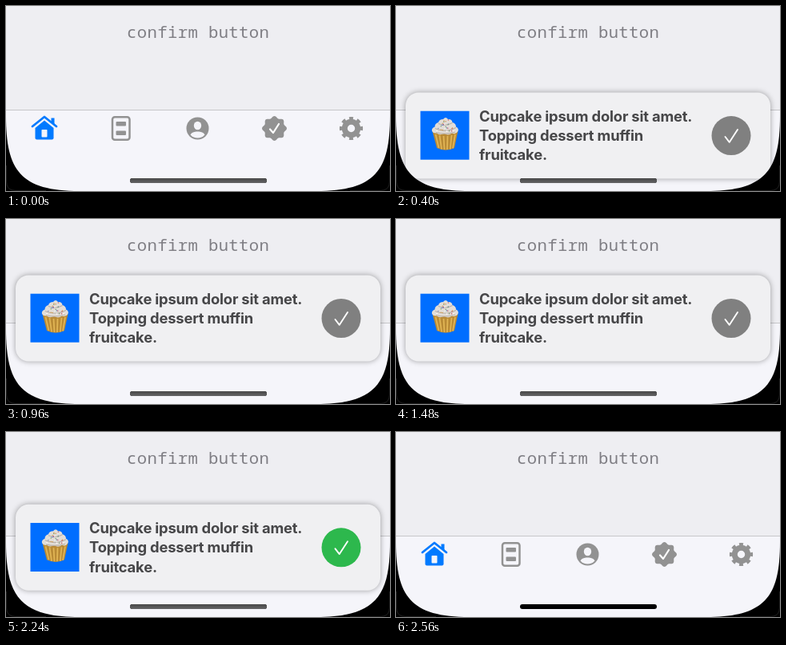
Recreate the animation shown at these times as an HTML page. Size 480 by 232 pixels, loop 2.92 s.

```html
<!DOCTYPE html>
<html lang="en">
<head>
<meta charset="utf-8">
<title>Confirm button toast</title>
<style>
  html, body { margin: 0; height: 100%; overflow: hidden; background: #eeeef2; }
  svg { display: block; width: 100vw; height: 100vh; }
  .title { font: 300 20.6px "Noto Sans Mono", monospace; letter-spacing: .37px; fill: #7f7e84; }
  .message { font: 700 18.4px Inter, sans-serif; letter-spacing: -.2px; fill: #464648; }
  .card { filter: drop-shadow(0 0 3.5px rgba(0, 0, 0, .36)); }
  .check { fill: none; stroke: #fff; stroke-linecap: round; stroke-linejoin: round; }
</style>
</head>
<body>
<svg viewBox="0 0 480 232">
  <linearGradient id="dim" x2="0" y2="1">
    <stop stop-color="#484848"/>
    <stop offset="1" stop-color="#646466"/>
  </linearGradient>

  <rect width="480" height="232" fill="#eeeef2"/>
  <text class="title" x="240.2" y="40" text-anchor="middle">confirm button</text>

  <rect y="130" width="480" height="102" fill="#f5f5fa"/>
  <rect y="130" width="480" height="1" fill="#c6c6ca"/>

  <g fill="#929292">
    <g fill="#007aff">
      <path d="M36.5 153 48 143.5 59.5 153V165.5Q59.5 167.5 57.5 167.5H38.5Q36.5 167.5 36.5 165.5Z"/>
      <path d="M56.5 140.5h4v8l-4-3.5z"/>
      <path d="M33 151 48 139 63 151" fill="none" stroke="#007aff" stroke-width="2.8" stroke-linecap="round" stroke-linejoin="round"/>
      <rect x="44.5" y="155" width="7" height="9.5" rx=".8" fill="#f5f5fa"/>
    </g>
    <rect x="133" y="139.2" width="21.5" height="28.6" rx="3" fill="none" stroke="#929292" stroke-width="2.5"/>
    <rect x="137.5" y="145" width="12.5" height="5.5" rx="1"/>
    <rect x="137.5" y="156.5" width="12.5" height="5.5" rx="1"/>
    <g transform="translate(239.5 153.5)">
      <circle r="14"/>
      <ellipse cy="-3.5" rx="4.7" ry="5.2" fill="#f5f5fa"/>
      <path d="M-9 8C-7 2.5 7 2.5 9 8A12 12 0 0 1-9 8Z" fill="#f5f5fa"/>
    </g>
    <g transform="translate(335.5 153.5)">
      <path id="seal"/>
      <path class="check" d="M-5.5 1 -1.5 5.5 5.5-5.5" stroke-width="2.2"/>
    </g>
    <g transform="translate(431.5 153.5)" fill="none" stroke="#929292">
      <circle r="8.2" stroke-width="7"/>
      <circle r="12.5" stroke-width="4.2" pathLength="16" stroke-dasharray="1 1" stroke-dashoffset=".5"/>
    </g>
  </g>

  <g id="toast">
    <rect class="card" x="12" y="70.5" width="456" height="108" rx="16.5" fill="#f0f0f2"/>
    <rect x="30.5" y="93.7" width="61" height="61" fill="#006eff"/>
    <g id="cupcake">
      <path d="M45.500 119H77.500L73 140Q62 145.500 51 140Z" fill="#b98a35"/>
      <path d="M49.5 123 53.5 140M54.5 124 57 141.5M59.5 125 60.5 142M64.5 125 64 142M69.5 124 67.8 141.5M74 123 71 140.5" stroke="#e2b656" stroke-width="1.7"/>
      <path d="M45 119Q44 115 48.5 113.5 48.500 109 53 108 54 104 59 104 62 100 65 104 70 103.500 70.5 108 75 109 75 113.5 79 115.5 77.500 119 75 123.500 70 121.500 65 125 60.5 122 54 124.500 51 121.500 46.500 122 45 119Z" fill="#e2ddd8"/>
      <path d="M49 115.5Q61 121.5 75 114.5M53 109.5Q62 113.5 70.5 108.5M50 120.500Q62 124 74 120" fill="none" stroke="#b9b0a8" stroke-width="1.2"/>
    </g>
    <g class="message">
      <text x="104" y="106.5">Cupcake ipsum dolor sit amet.</text>
      <text x="104" y="131">Topping dessert muffin</text>
      <text x="104" y="155.3">fruitcake.</text>
    </g>
    <circle id="button" cx="419" cy="124.5" r="24.5"/>
    <path class="check" d="M411.5 126 416.8 132.8 427 117" stroke-width="1.9"/>
  </g>

  <rect x="155" y="216" width="171" height="6" rx="3"/>
  <rect id="dimmed" x="155" y="216" width="171" height="6" rx="3" fill="url(#dim)"/>

  <g id="corner">
    <path d="M0 138C0 206 18 232 92 232H0Z"/>
    <path d="M.5 200V220Q.5 231.5 12 231.5H50" fill="none" stroke="#292929" stroke-width=".8"/>
  </g>
  <use href="#corner" transform="translate(480) scale(-1 1)"/>
</svg>

<script>
const LOOP = 2920, STEP = 40;
const TRAVEL = 212, SLIDE = 620, ENTER = -38, LEAVE = 2106;
const GRAY = [128, 128, 128], DARK_GREEN = [47, 145, 70], GREEN = [45, 184, 77];
const byId = id => document.getElementById(id);
const [toast, button, dimmed] = ["toast", "button", "dimmed"].map(byId);

const progress = (t, start, duration) => Math.min(1, Math.max(0, (t - start) / duration));
const mix = (a, b, p) => a.map((v, i) => v + (b[i] - v) * p);
const rgb = color => `rgb(${color.map(Math.round)})`;

// cubic-bezier(.42, 0, .58, 1), solved by bisection
function easeInOut(x) {
  let low = 0, high = 1, u;
  for (let i = 0; i < 20; i++) {
    u = (low + high) / 2;
    const bx = 3 * u * (1 - u) * (.42 * (1 - u) + .58 * u) + u ** 3;
    if (bx < x) low = u; else high = u;
  }
  return u * u * (3 - 2 * u);
}

function drawSeal() {
  const points = Array.from({ length: 96 }, (_, i) => {
    const a = i * Math.PI / 48, r = 14.2 + 1.3 * Math.cos(8 * a);
    return `${(r * Math.cos(a)).toFixed(2)} ${(r * Math.sin(a)).toFixed(2)}`;
  });
  byId("seal").setAttribute("d", `M${points.join("L")}Z`);
}

function addSprinkles() {
  const colors = ["#c8596a", "#d0964a", "#6f9b72", "#7d8fc0", "#fff"];
  let seed = 7;
  const random = () => (seed = seed * 16807 % 2147483647) / 2147483647;
  for (let i = 0; i < 30; i++) {
    const y = 105 + 15 * random();
    const x = 62 + (random() - .5) * (8 + (y - 105) * 1.2);
    const dot = document.createElementNS("http://www.w3.org/2000/svg", "circle");
    for (const [key, value] of Object.entries({ cx: x, cy: y, r: .75, fill: colors[i % 5] }))
      dot.setAttribute(key, value);
    byId("cupcake").append(dot);
  }
}

function render() {
  const t = Math.floor(performance.now() % LOOP / STEP) * STEP;
  const shown = easeInOut(progress(t, ENTER, SLIDE)) - easeInOut(progress(t, LEAVE, SLIDE));
  toast.setAttribute("transform", `translate(0 ${TRAVEL * (1 - shown)})`);

  const pressed = mix(GRAY, DARK_GREEN, progress(t, 1600, 200));
  button.setAttribute("fill", rgb(mix(pressed, GREEN, progress(t, 1840, 240))));
  dimmed.setAttribute("opacity", 1 - progress(t, 2280, 280));
  requestAnimationFrame(render);
}

drawSeal();
addSprinkles();
render();
</script>
</body>
</html>
```
